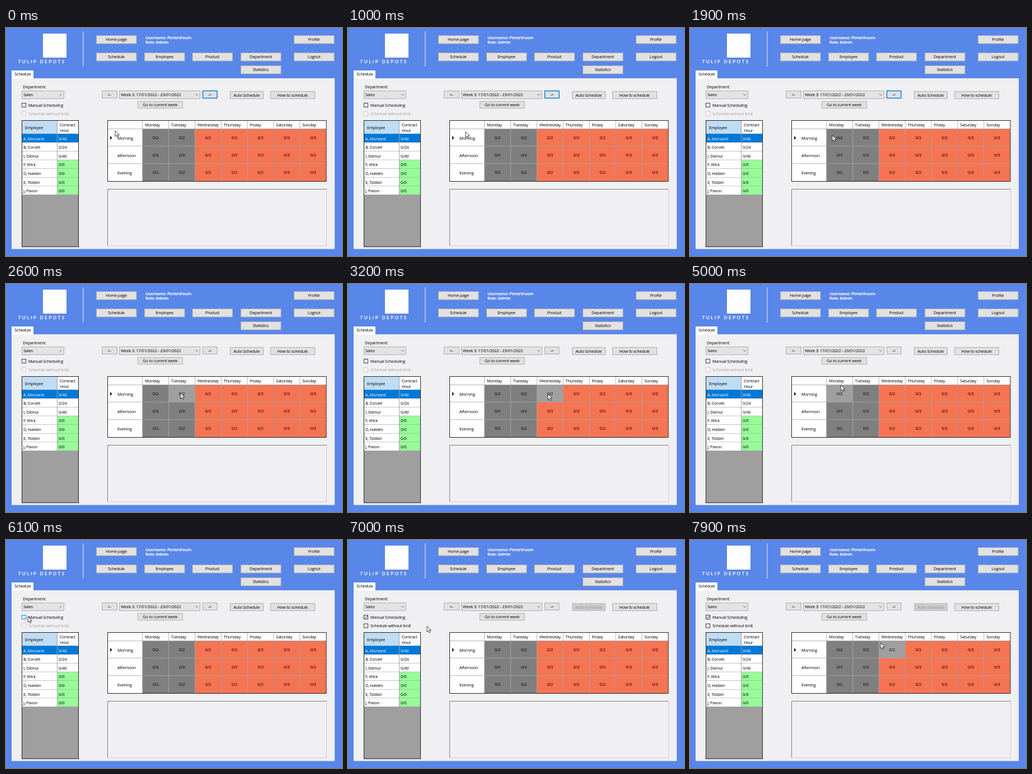
An HTML page that plays this animation: 600 by 408 pixels, repeating every 8000 ms.

```html
<!DOCTYPE html>
<html lang="en">
<head>
<meta charset="utf-8">
<title>Schedule</title>
<style>
html, body { margin: 0; width: 100%; height: 100%; overflow: hidden; background: #5986e9; }
svg { display: block; }
text { font: 500 7.4px "Open Sans", "Noto Sans", sans-serif; letter-spacing: -.2px; fill: #000; white-space: pre; }
.mid { text-anchor: middle; }
.bold { font-weight: 700; font-size: 7.3px; letter-spacing: -.25px; fill: #fff; }
.brand { font: 700 8.2px Lato, sans-serif; letter-spacing: 2.4px; fill: #fff; }
</style>
</head>
<body>
<svg id="stage" width="600" height="408" viewBox="0 0 600 408"></svg>
<script>
const stage = document.getElementById('stage');

function add(tag, attrs, content) {
  const node = document.createElementNS('http://www.w3.org/2000/svg', tag);
  for (const key in attrs) node.setAttribute(key, attrs[key]);
  if (content) node.textContent = content;
  return stage.appendChild(node);
}
const rect = (x, y, width, height, fill) => add('rect', { x, y, width, height, fill });
const box = (x, y, w, h, fill, stroke) =>
  add('rect', { x: x + .5, y: y + .5, width: w - 1, height: h - 1, fill, stroke });
const text = (x, y, label, cls = '') => add('text', { x, y, class: cls }, label);
const line = (d, stroke, width = 1) => add('path', { d, stroke, fill: 'none', 'stroke-width': width });

function button(x, y, w, h, label) {
  return {
    frame: box(x, y, w, h, '#e1e1e1', '#adadad'),
    label: text(x + w / 2 - .3, y + h / 2 + 2.7, label, 'mid')
  };
}
function combo(x, w, label) {
  box(x, 112, w, 15, '#e3e3e3', '#adadad');
  text(x + 3, 122.3, label);
  line(`M${x + w - 9} 118.2l2.5 2.5 2.5-2.5`, '#555', .9);
}
function checkbox(y, label) {
  return { frame: box(28, y, 8, 8, '#fff', '#333'), label: text(40, y + 6.7, label) };
}

// Header
rect(66, 10, 42, 43, '#fff');
text(21.5, 63.2, 'TULIP DEPOTS', 'brand');
rect(137, 6, 1.5, 63, '#bccdf6');
text(249, 20, 'Username: PimteVroom', 'bold');
text(249, 27.7, 'Role: Admin', 'bold');
[
  [161, 13, 'Home page'], [161, 44, 'Schedule'], [247, 44, 'Employee'],
  [332.5, 44, 'Product'], [419, 44, 'Department'], [419, 67, 'Statistics'],
  [514, 13, 'Profile'], [514, 44, 'Logout']
].forEach(([x, y, label]) => button(x, y, 72.5, 15.5, label));

// Tab page
rect(10, 90, 577, 305.5, '#f0eff1');
rect(10, 76, 39, 15, '#fff');
text(15, 85.3, 'Schedule');

// Filters
text(30, 108.2, 'Department:');
combo(28, 76, 'Sales');
const manual = checkbox(134, 'Manual Scheduling');
const limit = checkbox(149.5, 'Schedule without limit');
const tick = line('M29.8 137.8l1.8 1.9 3.2-4', '#111');

// Week bar
button(171, 112, 28, 14, '<-');
combo(202, 145, 'Week 3: 17/01/2022 - 23/01/2022');
const next = button(351, 112, 26.5, 14, '->');
button(235, 131, 81, 13, 'Go to current week');
const auto = button(400, 113, 60, 14, 'Auto Schedule');
button(472, 113, 80, 14, 'How to schedule');

// Employee list
rect(28, 165, 102, 227, '#a09fa0');
rect(29, 165, 63, 24, '#bfdcf5');
rect(92, 165, 37, 24, '#fff');
line('M91.5 165v24M29 189.5h100', '#a0a0a0');
text(34, 180.8, 'Employee');
text(96, 175.8, 'Contract');
text(96, 185.8, 'Hour');
[
  ['A, Morvanti', 40], ['B, Corvell', 24], ['I, Demul', 40], ['F, Wick', 0],
  ['D, Halden', 0], ['E, Tobbin', 0], ['J, Pavon', 0]
].forEach(([name, hours], i) => {
  const y = 189.5 + i * 15.6;
  const fill = i ? '#fff' : '#0078d7';
  rect(29, y, 62, 15, fill);
  rect(92, y, 37, 15, hours ? fill : '#98fb98');
  const labels = [text(31, y + 11, name), text(94, y + 11, '0/' + hours)];
  if (!i) labels.forEach(label => label.style.fill = '#fff');
});
box(28, 165, 102, 227, 'none', '#222');

// Week grid
const colX = c => 243.7 + c * 46.86;
const rowY = [180.5, 211.2, 242.7, 274];
const days = ['Monday', 'Tuesday', 'Wednesday', 'Thursday', 'Friday', 'Saturday', 'Sunday'];
const cells = [];
rect(181, 165, 391, 110, '#fff');
['Morning', 'Afternoon', 'Evening'].forEach((shift, r) => {
  text(199, rowY[r] + 19.6, shift);
  days.forEach((day, c) => {
    cells.push(rect(colX(c), rowY[r], 46.86, rowY[r + 1] - rowY[r], ''));
    text(colX(c) + 23.4, rowY[r] + 18.6, r === 1 || c > 4 ? '0/3' : '0/2', 'mid');
  });
});
days.forEach((day, c) => {
  text(colX(c) + 4.3, 176, day);
  line(`M${colX(c)} 165v110`, '#a0a0a0', .8);
});
rowY.slice(0, 3).forEach(y => line(`M181 ${y}h391`, '#a0a0a0', .8));
box(181, 165, 391.5, 110, 'none', '#222');
const marker = add('path', { d: 'M186 193l3.5 3.5-3.5 3.5z', fill: '#111' });

// Detail panel
line('M181.5 390v-101.5h391', '#7c7c7c');
line('M181 389.5h391.5v-101', '#cfcfcf');

const cursor = add('path', {
  d: 'M0 0v10.2l2.4-2.2 1.7 3.8 1.8-.8-1.7-3.7h3.3z',
  fill: '#fff', stroke: '#111', 'stroke-width': .8
});

// Pointer path: time, x, y
const path = [
  [0, 195, 184], [600, 197, 184], [1900, 254, 192], [3200, 357, 197], [3500, 361, 220],
  [3900, 365, 201], [5000, 269, 181], [6100, 39, 137], [6400, 33, 138], [7900, 340, 184]
];
function pointer(t) {
  const i = Math.max(1, path.findIndex(p => p[0] >= t));
  const [a, b] = [path[i - 1], path[i]];
  const u = (t - a[0]) / (b[0] - a[0]);
  const s = u * u * (3 - 2 * u);
  return [a[1] + (b[1] - a[1]) * s, a[2] + (b[2] - a[2]) * s];
}

function draw(t) {
  const [x, y] = pointer(t);
  cursor.setAttribute('transform', `translate(${x} ${y})`);

  const col = Math.floor((x - colX(0)) / 46.86);
  const row = rowY.findIndex((top, r) => y >= top && y < rowY[r + 1]);
  const hover = t > 2000 && col >= 0 && row >= 0 ? row * 7 + col : -1;
  cells.forEach((cell, i) =>
    cell.setAttribute('fill', i === hover ? '#a09fa0' : i % 7 < 2 ? '#807f80' : '#f57452'));
  marker.setAttribute('transform', `translate(0 ${t >= 3500 && t < 4600 ? 31 : 0})`);

  const focused = t < 2400;
  next.frame.setAttribute('stroke', focused ? '#0078d7' : '#adadad');
  next.frame.setAttribute('stroke-width', focused ? 1.4 : 1);

  const checked = t >= 6500;
  const overBox = x > 27 && x < 105 && y > 132 && y < 143;
  manual.frame.setAttribute('stroke', overBox ? '#0078d7' : '#333');
  tick.style.display = checked ? '' : 'none';
  limit.frame.setAttribute('stroke', checked ? '#333' : '#c8c8c8');
  limit.label.style.fill = checked ? '#000' : '#a6a6a6';
  auto.frame.setAttribute('fill', checked ? '#cccccc' : '#e1e1e1');
  auto.frame.setAttribute('stroke', checked ? '#bfbfbf' : '#adadad');
  auto.label.style.fill = checked ? '#939393' : '#000';
}

const start = performance.now();
function play() {
  draw(Math.floor((performance.now() - start) % 8000 / 100) * 100);
  requestAnimationFrame(play);
}
play();
</script>
</body>
</html>
```
